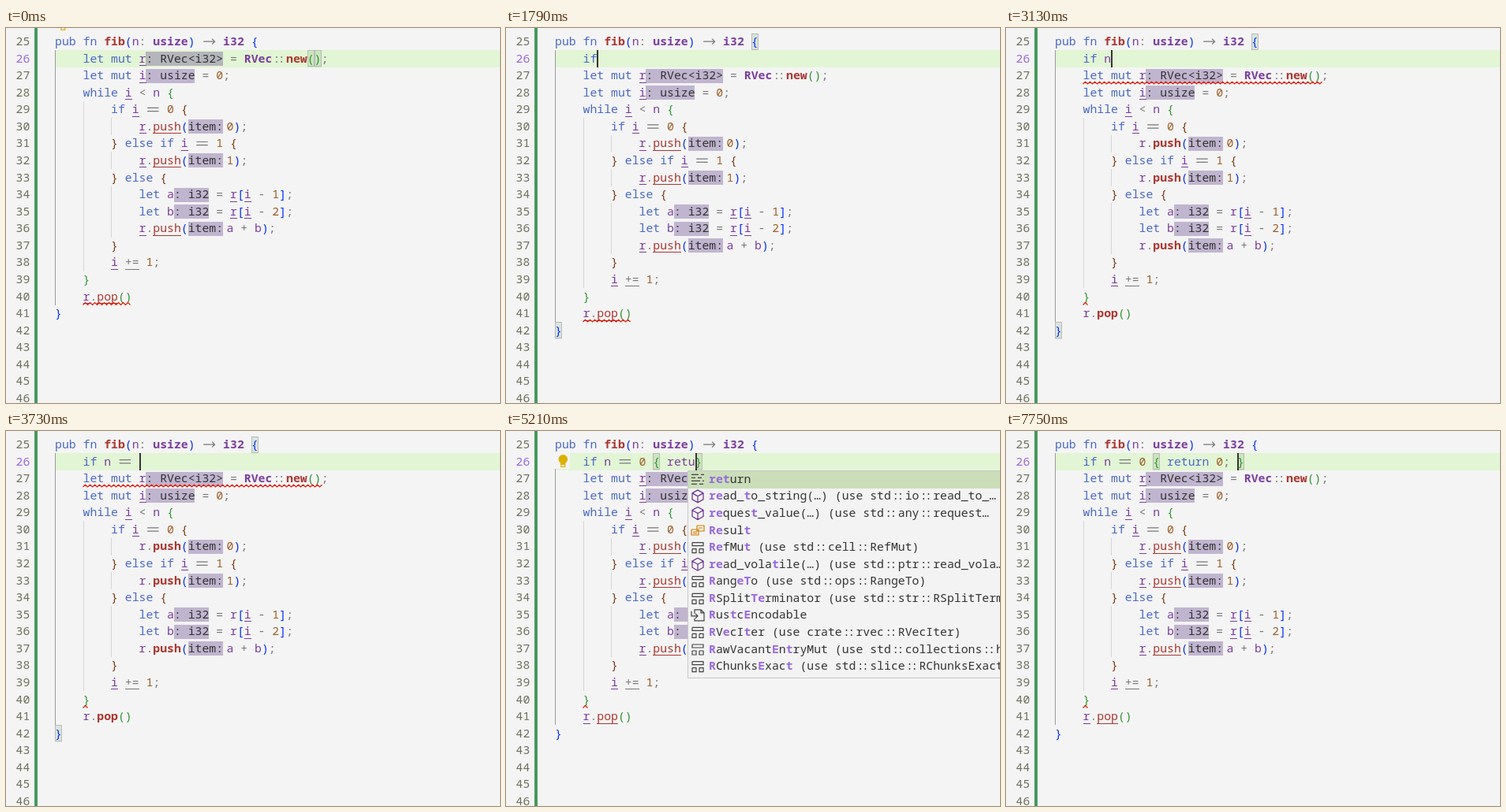
Recreate the animation shown at these times as an HTML page with a canvas. Size 626 by 476 pixels, loop 8000 ms.

```html
<!DOCTYPE html>
<html lang="en">
<head>
<meta charset="utf-8">
<title>Editing a Rust function</title>
<style>
  html, body { margin: 0; width: 100%; height: 100%; overflow: hidden; background: #f4f4f4; }
  canvas { display: block; }
</style>
</head>
<body>
<canvas id="stage" width="626" height="476"></canvas>
<script>
const ctx = document.getElementById('stage').getContext('2d');
const W = 626, H = 476, LOOP = 8000;
const LEFT = 62, TOP = 6.5, CHAR = 8.88, LINE = 21.57, BASELINE = 15.5;
const FONT = '14.8px "Noto Sans Mono", monospace';
const PAPER = '#f4f4f4', GRAY = '#777777', PURPLE = '#7a3e9d', RED = '#aa3731', MATCH = '#9769dc', DARK = '#333333';
const BRACKETS = ['#0431fa', '#319331', '#7b3814'];

const CODE = [
  'pub fn fib(n: usize) -> i32 {',
  '    let mut r«: RVec<i32>» = RVec::new();',
  '    let mut i«: usize» = 0;',
  '    while i < n {',
  '        if i == 0 {',
  '            r.push(«item:»0);',
  '        } else if i == 1 {',
  '            r.push(«item:»1);',
  '        } else {',
  '            let a«: i32» = r[i - 1];',
  '            let b«: i32» = r[i - 2];',
  '            r.push(«item:»a + b);',
  '        }',
  '        i += 1;',
  '    }',
  '    r.pop()',
  '}',
];

// Asterisks switch the matched letters on and off.
const IF_LET = [['keyword', '*if* let']];
const RETURN = [['keyword', '*return*']];
const RET_LIST = [
  ['keyword', '*ret*urn'],
  ['method', '*re*ad_*t*o_string(…) (use std::io::read_to_…'],
  ['method', '*re*ques*t*_value(…) (use std::any::request…'],
  ['enum', '*Re*sul*t*'],
  ['struct', '*Re*fMu*t* (use std::cell::RefMut)'],
  ['method', '*re*ad_vola*t*ile(…) (use std::ptr::read_vola…'],
  ['struct', '*R*ang*eT*o (use std::ops::RangeTo)'],
  ['struct', '*R*Split*Te*rminator (use std::str::RSplitTerminator)'],
  ['reference', '*R*us*t*c*E*ncodable'],
  ['struct', '*R*V*e*cI*t*er (use crate::rvec::RVecIter)'],
  ['struct', '*R*awVacant*E*n*t*ryMut (use std::collections::hash_map)'],
  ['struct', '*R*Chunks*E*xac*t* (use std::slice::RChunksExact)'],
];

// Each step changes part of the state. "|" in the typed text is the caret position.
const STEPS = [
  [0, { typed: null, activeRow: 1, caret: false, match: 'call', bulb: -1, resolved: true, wavy: ['pop'], popup: null }],
  [150, { activeRow: 0, caret: true, match: null }],
  [600, { caret: false }],
  [900, { typed: '|', activeRow: 1, caret: true, match: 'outer' }],
  [1050, { bulb: null }],
  [1340, { caret: false }],
  [1640, { typed: 'i|', caret: true }],
  [1790, { typed: 'if|' }],
  [1940, { typed: 'if |', resolved: false, wavy: ['brace'] }],
  [2090, { popup: { col: 7, items: IF_LET } }],
  [2380, { popup: null, match: null }],
  [2830, { match: 'outer', wavy: ['brace', 'let'], caret: false }],
  [3130, { typed: 'if n|', caret: true }],
  [3280, { typed: 'if n |' }],
  [3430, { typed: 'if n =|' }],
  [3580, { typed: 'if n ==|' }],
  [3730, { typed: 'if n == |' }],
  [3880, { typed: 'if n == 0|' }],
  [4030, { typed: 'if n == 0 |', resolved: true, wavy: ['brace'] }],
  [4180, { typed: 'if n == 0 {|}', match: 'inner' }],
  [4470, { bulb: 1 }],
  [4620, { caret: false }],
  [4920, { typed: 'if n == 0 { r|}', caret: true }],
  [5060, { typed: 'if n == 0 { ret|}', popup: { col: 19, items: RET_LIST } }],
  [5210, { typed: 'if n == 0 { retu|}' }],
  [5360, { typed: 'if n == 0 { return|}', popup: { col: 19, items: RETURN } }],
  [5510, { typed: 'if n == 0 { return |}', popup: null }],
  [5650, { typed: 'if n == 0 { return 0|}' }],
  [6250, { caret: false }],
  [6550, { typed: 'if n == 0 { return 0;|}', caret: true }],
  [6700, { typed: 'if n == 0 { return 0; |}' }],
  [7000, { bulb: null }],
  [7300, { caret: false }],
  [7750, { caret: true }],
];

const TOKEN = /«[^»]*»|\w+|\+=|==|->|::|./g;
const STYLES = [
  [/^(pub|fn|let|mut|while|if|else|return)$/, '#4b69c6'],
  [/^\d+$/, '#9c5d27'],
  [/^(usize|i32|RVec)$/, PURPLE, true],
  [/^(fib|new)$/, RED, true],
  [/^(push|pop)$/, RED],
  [/^\w+$/, PURPLE],
  [/./, GRAY],
];

const colX = col => LEFT + col * CHAR;
const rowY = row => TOP + row * LINE;

// Fills a box snapped to whole pixels.
function rect(x, y, w, h, color) {
  ctx.fillStyle = color;
  ctx.fillRect(Math.round(x), Math.round(y), Math.round(w), Math.round(h));
}

function stroke(color, width, ...lines) {
  ctx.strokeStyle = color;
  ctx.lineWidth = width;
  ctx.beginPath();
  for (const points of lines) points.forEach(([x, y], i) => i ? ctx.lineTo(x, y) : ctx.moveTo(x, y));
  ctx.stroke();
}

// Writes on the character grid, with joined forms for ==, -> and ::
function write(text, x, y, color, bold) {
  ctx.font = (bold ? 'bold ' : '') + FONT;
  for (const [part] of text.matchAll(/==|->|::|./g)) {
    const mid = y - 4.8, end = x + 2 * CHAR - 1.7;
    ctx.fillStyle = color;
    if (part === '==') {
      stroke(color, 1.2, ...[-2.1, 2.1].map(d => [[x + 1.7, mid + d], [end, mid + d]]));
    } else if (part === '->') {
      stroke(color, 1.2, [[x + 1.7, mid], [end, mid]], [[end - 3.5, mid - 3.5], [end, mid], [end - 3.5, mid + 3.5]]);
    } else if (part === '::') {
      ctx.fillText(':', x + 1.3, y);
      ctx.fillText(':', x + CHAR - 1.3, y);
    } else {
      ctx.fillText(part, x, y);
    }
    x += part.length * CHAR;
  }
}

function drawHint(text, x, row) {
  const pad = text === 'item:' ? CHAR / 2 : 0;
  rect(x, rowY(row) + 2, text.length * CHAR, 18, 'rgba(112,86,151,.4)');
  write(text, x, rowY(row) + BASELINE, DARK);
  return text.length * CHAR + pad;
}

function drawCode(source, row, depth, resolved, isTyped) {
  const y = rowY(row) + BASELINE;
  let x = LEFT;
  for (const [token] of source.matchAll(TOKEN)) {
    if (token[0] === '«') {
      x += drawHint(token.slice(1, -1), x, row);
      continue;
    }
    let [, color, bold] = STYLES.find(([pattern]) => pattern.test(token));
    if ('})]'.includes(token)) depth--;
    if ('{([})]'.includes(token)) color = BRACKETS[depth % 3];
    if ('{(['.includes(token)) depth++;
    if (/^(push|pop)$/.test(token)) bold = !resolved;
    write(token, x, y, color, bold);
    const mutable = /^(i|\+=)$/.test(token) || resolved && /^(r|push|pop)$/.test(token);
    if (mutable && !isTyped) rect(x, y + 3.5, token.length * CHAR, 1, color);
    x += token.length * CHAR;
  }
  return depth;
}

function drawSquiggle(row, from, to) {
  const y = rowY(row) + BASELINE + 4.5, points = [];
  for (let x = colX(from), up = 1; x <= colX(to); x += 3, up = -up) points.push([x, y + up * 1.4]);
  stroke('#e51400', 1.2, points);
}

function drawBracketBox(row, col) {
  rect(colX(col), rowY(row) + 0.5, CHAR, LINE - 1, 'rgba(0,100,0,.1)');
  ctx.strokeStyle = '#b9b9b9';
  ctx.lineWidth = 1;
  ctx.strokeRect(Math.round(colX(col)) + 0.5, Math.round(rowY(row)) + 0.5, CHAR - 1, LINE - 1.5);
}

function drawGuides(shift) {
  const guide = (col, first, last, color) =>
    rect(LEFT + col * CHAR, rowY(first), 1, (last - first + 1) * LINE, color);
  guide(0, 1, 15 + shift, '#9b9b9b');
  for (const [col, first, last] of [[4, 4, 13], [8, 5, 5], [8, 7, 7], [8, 9, 11]])
    guide(col, first + shift, last + shift, '#d5d5d5');
}

function drawBulb(row) {
  const y = rowY(row);
  rect(LEFT, y, 19, 20, PAPER);
  ctx.fillStyle = '#ddb100';
  ctx.beginPath();
  ctx.arc(72.3, y + 7.8, 5.8, 0, 2 * Math.PI);
  ctx.fill();
  rect(69.3, y + 11, 6, 4, '#ddb100');
  ctx.strokeStyle = '#ddb100';
  ctx.lineWidth = 1.2;
  ctx.strokeRect(69.8, y + 14, 5, 3.4);
}

const box = (x, y, w, h) => [[x, y], [x + w, y], [x + w, y + h], [x, y + h], [x, y]];
const ICONS = {
  keyword: ['#424242', [[-8, -6], [1, -6]], [[4, -6], [8, -6]], [[-8, -2], [-3, -2]], [[0, -2], [5, -2]],
    [[-8, 2], [3, 2]], [[6, 2], [8, 2]], [[-8, 6], [-1, 6]], [[2, 6], [7, 6]]],
  method: ['#652d90', [[0, -8], [7, -4], [7, 4], [0, 8], [-7, 4], [-7, -4], [0, -8]],
    [[-7, -4], [0, 0], [7, -4]], [[0, 0], [0, 8]]],
  enum: ['#d67e00', box(-1, -6, 9, 7), box(-8, -1, 9, 7), [[1, -3], [6, -3]], [[-6, 2], [-1, 2]], [[-6, 4], [-1, 4]]],
  struct: ['#424242', box(-7, -6, 14, 4), box(-7, 2, 5, 5), box(2, 2, 5, 5)],
  reference: ['#424242', [[-4, -2], [-4, -7], [4, -7], [8, -3], [8, 7], [-4, 7], [-4, 4]],
    [[4, -7], [4, -3], [8, -3]], [[-8, -5], [-8, 1], [0, 1]], [[-3, -2], [0, 1], [-3, 4]]],
};

function drawPopup({ col, items }) {
  const left = Math.floor(colX(col)), top = 50;
  const height = items.length > 1 ? 264 : 23;
  rect(left, top, W, height, '#c8c8c8');
  rect(left + 1, top + 1, W, height - 2, '#f3f3f3');
  rect(left + 1, top + 1, W, LINE, '#cadeb9');
  items.forEach(([kind, label], i) => {
    const y = top + 0.3 + i * LINE;
    const [color, ...lines] = ICONS[kind];
    ctx.save();
    ctx.translate(left + 13, y + 11);
    stroke(color, 1.2, ...lines);
    ctx.restore();
    let x = left + 27;
    label.split('*').forEach((part, n) => {
      write(part, x, y + BASELINE, n % 2 ? MATCH : DARK, n % 2 === 1);
      x += part.length * CHAR;
    });
  });
}

function draw(time) {
  const state = Object.assign({}, ...STEPS.filter(([at]) => at <= time).map(([, change]) => change));
  const inserted = state.typed !== null;
  const shift = inserted ? 1 : 0;
  const typedLine = '    ' + (state.typed || '').replace('|', '');
  const lines = inserted ? [CODE[0], typedLine, ...CODE.slice(1)] : CODE;

  rect(0, 0, W, H, PAPER);
  rect(LEFT, rowY(state.activeRow), W, 22, '#e2f5d4');
  rect(36, 0, 4, H, '#48985d');
  for (let row = -1; row <= 21; row++)
    write(String(25 + row), 12.6, rowY(row) + BASELINE, row === state.activeRow ? MATCH : '#6d705b');

  drawGuides(shift);
  const matches = {
    call: [[1, 36], [1, 37]],
    outer: [[0, 28], [lines.length - 1, 0]],
    inner: [[1, 14], [1, typedLine.length - 1]],
  };
  for (const [row, col] of matches[state.match] || []) drawBracketBox(row, col);

  let depth = 0;
  lines.forEach((line, row) => {
    depth = drawCode(line, row, depth, state.resolved, inserted && row === 1);
  });

  const squiggles = { let: [1, 4, 38.4], brace: [14, 4, 5], pop: [15, 4, 11] };
  for (const name of state.wavy) {
    const [row, from, to] = squiggles[name];
    drawSquiggle(row + shift, from, to);
  }
  if (state.bulb !== null) drawBulb(state.bulb);
  if (state.caret) {
    const col = inserted ? 4 + state.typed.indexOf('|') : 27;
    rect(colX(col), rowY(state.activeRow), 2, 22, '#3a3335');
  }
  if (state.popup) drawPopup(state.popup);
}

function tick() {
  draw(performance.now() % LOOP);
  requestAnimationFrame(tick);
}
tick();
</script>
</body>
</html>
```
